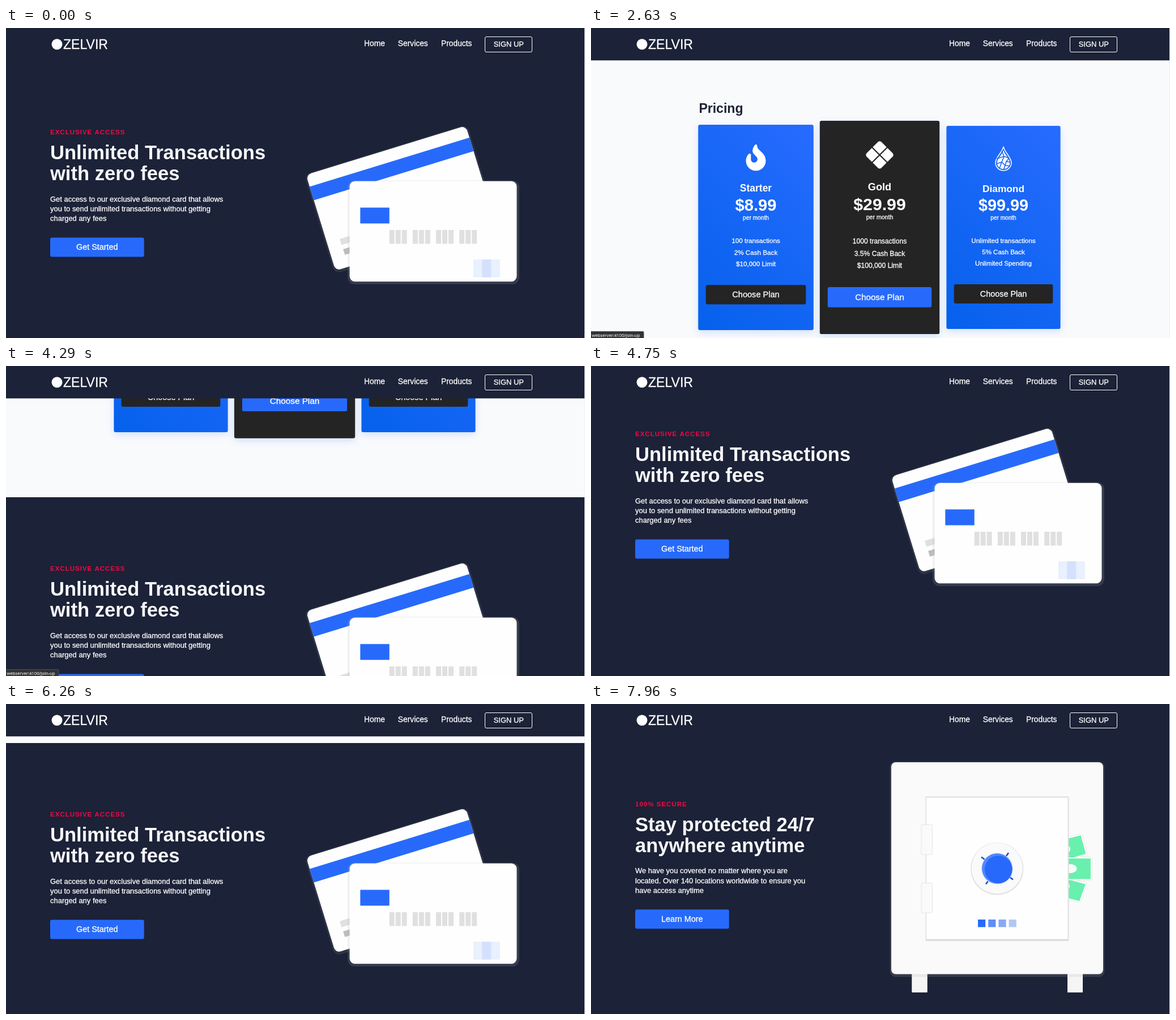
Write an HTML page with a canvas that moves like this. It is 1022 px wide and 548 px high and loops after 8 s.

```html
<!DOCTYPE html>
<html lang="en">
<head>
<meta charset="utf-8">
<title>Landing page tour</title>
<style>
  html, body { margin: 0; width: 100%; height: 100%; overflow: hidden; background: #1c2237; }
  canvas { display: block; }
</style>
</head>
<body>
<canvas id="stage" width="1022" height="548"></canvas>
<script>
const ctx = document.getElementById('stage').getContext('2d');
const W = 1022, H = 548, LOOP = 8000, TICK = 78.5, NOTCH = 248 / 3;
const NAVY = '#1c2237', BLUE = '#276afb', RED = '#f00946', INK = '#242424', PALE = '#f9fafc';
const SANS = '"Liberation Sans", Arial, sans-serif';
const HUMANIST = '"Open Sans", "Noto Sans", sans-serif';
const HERO_TOP = 647, CARD_Y = 352.5;

const clamp = v => Math.max(0, Math.min(1, v));
const easeOut = p => 1 - (1 - clamp(p)) ** 3;
const easeFast = p => 1 - (1 - clamp(p)) ** 4;
const smooth = p => { p = clamp(p); return p * p * (3 - 2 * p); };

// start, duration, wheel notches, easing
const scrolls = [
  [2690, 460, 3, smooth],
  [4160, 360, 3, easeOut],
  [4618, 440, 3, easeOut],
  [5170, 360, 3, easeOut],
  [5594, 620, -5, smooth],
];
const scrollAt = t => Math.floor(0.01 + NOTCH *
  scrolls.reduce((sum, [at, dur, n, ease]) => sum + n * ease((t - at) / dur), 0));

// 0..1 amount of a 300 ms hover transition over several [on, off] spans
const hover = (t, ...spans) => spans.reduce((sum, [on, off]) =>
  sum + easeFast((t - on) / 300) - easeFast((t - off) / 300), 0);

function text(str, x, y, size, { weight = 400, color = '#fff', align = 'left', font = SANS, spacing = 0 } = {}) {
  ctx.font = `${weight} ${size}px ${font}`;
  ctx.letterSpacing = spacing + 'px';
  ctx.fillStyle = color;
  ctx.textAlign = align;
  ctx.fillText(str, x, y);
  if (weight < 700) {
    // a hairline gives regular text its fuller on-screen weight
    ctx.strokeStyle = color;
    ctx.lineWidth = 0.3;
    ctx.lineJoin = 'round';
    ctx.strokeText(str, x, y);
  }
}

function rect(x, y, w, h, color, r = 0) {
  ctx.fillStyle = color;
  ctx.beginPath();
  ctx.roundRect(x, y, w, h, r);
  ctx.fill();
}

function outline(x, y, w, h, color, r = 0, width = 1) {
  ctx.strokeStyle = color;
  ctx.lineWidth = width;
  ctx.beginPath();
  ctx.roundRect(x, y, w, h, r);
  ctx.stroke();
}

function oval(x, y, rx, ry, color) {
  ctx.fillStyle = color;
  ctx.beginPath();
  ctx.ellipse(x, y, rx, ry, 0, 0, Math.PI * 2);
  ctx.fill();
}

function poly(points, color) {
  ctx.fillStyle = color;
  ctx.beginPath();
  points.forEach(([x, y]) => ctx.lineTo(x, y));
  ctx.closePath();
  ctx.fill();
}

function at(x, y, draw) {
  ctx.save();
  ctx.translate(x, y);
  draw();
  ctx.restore();
}

function heroText({ tag, title, copy, button }) {
  text(tag, 78, 188, 11.52, { weight: 700, color: RED, spacing: 1 });
  title.forEach((s, i) => text(s, 78, 231.7 + i * 37.7, 34.56, { weight: 700, color: '#f7f8fa' }));
  copy.forEach((s, i) => text(s, 78, 306.5 + i * 17.28, 12.96));
  rect(78, 370.5, 165.7, 34, BLUE, 3);
  text(button, 160.8, 392, 14.4, { align: 'center' });
}

const SHADE = 'rgba(170,170,170,0.18)';

function bankCards() {
  at(529.5, 259.5, () => {
    ctx.rotate(-17.1 * Math.PI / 180);
    rect(-3, -1.5, 301, 184, 'rgba(170,170,170,0.13)', 12);
    rect(0, 0, 295, 177.5, '#fefefe', 9.5);
    rect(0, 22, 295, 25, BLUE);
    rect(23.5, 126, 60, 11, '#e0e0e0');
    rect(24, 145, 60, 10.5, '#bdbdbd');
  });
  rect(603, 269.5, 303, 183.5, SHADE, 12);
  rect(606.5, 270.8, 295, 177.4, '#fefefe', 9.5);
  rect(625.3, 317.5, 51.4, 28, BLUE);
  for (let i = 0; i < 12; i++)
    rect(676.6 + Math.floor(i / 3) * 41.2 + (i % 3) * 11, 357, 9, 24.5, '#e0e0e0');
  rect(825, 409.2, 47, 31.6, '#e9f0fe');
  rect(840.3, 409.2, 16, 31.6, '#d5e1fc');
}

const cardsHero = {
  tag: 'EXCLUSIVE ACCESS',
  title: ['Unlimited Transactions', 'with zero fees'],
  copy: ['Get access to our exclusive diamond card that allows',
    'you to send unlimited transactions without getting', 'charged any fees'],
  button: 'Get Started',
};
const safeHero = {
  tag: '100% SECURE',
  title: ['Stay protected 24/7', 'anywhere anytime'],
  copy: ['We have you covered no matter where you are',
    'located. Over 140 locations worldwide to ensure you', 'have access anytime'],
  button: 'Learn More',
};

function drawCardsHero() {
  heroText(cardsHero);
  bankCards();
}

function bill(points) {
  ctx.strokeStyle = '#fff';
  ctx.lineWidth = 4;
  ctx.shadowColor = 'rgba(0,0,0,0.18)';
  ctx.shadowBlur = 2;
  poly(points, '#69f0ae');
  ctx.stroke();
  ctx.shadowBlur = 0;
  poly(points, '#69f0ae');
}

function safe() {
  for (const x of [566.5, 841]) {
    rect(x, 470, 27, 40, '#dcdcdc');
    rect(x, 470, 27, 39, '#f5f5f5');
  }
  rect(527.5, 101.5, 379, 381, SHADE, 10);
  rect(530, 103, 374, 374.5, '#fafafa', 8);

  ctx.save();
  ctx.beginPath();
  ctx.rect(842, 200, 62, 180);
  ctx.clip();
  bill([[830, 241], [864.5, 232], [873.5, 265], [830, 277]]);
  bill([[830, 307], [873, 318.5], [862, 348.5], [830, 340]]);
  bill([[830, 273], [882, 273], [882, 309.5], [830, 309.5]]);
  oval(845.5, 291, 12, 8, '#fafafa');
  oval(841, 256.5, 5, 6, '#fafafa');
  oval(840, 322, 5, 5.5, '#fafafa');
  ctx.restore();

  rect(590.5, 163.5, 253, 255.5, '#dedede');
  rect(592, 165.5, 249.5, 250, '#fefefe');
  for (const y of [213, 316]) {
    rect(582.5, y, 20.5, 53, '#fafafa', 1);
    outline(583, y + 0.5, 19.5, 52.5, '#e6e6e6', 1);
  }

  oval(716.7, 291.2, 46.6, 46.4, '#e2e2e2');
  oval(716.7, 290.3, 45, 45, '#fafafa');
  ctx.strokeStyle = '#184fc4';
  ctx.lineWidth = 2.6;
  ctx.beginPath();
  for (const [x, y, u, v] of [[689, 270.5, 697, 276.5], [731, 271.5, 737, 263],
    [737, 304.5, 745, 310.5], [703, 310, 697, 318.5]]) {
    ctx.moveTo(x, y);
    ctx.lineTo(u, v);
  }
  ctx.stroke();
  oval(716.8, 291.2, 27.8, 27.8, '#dfe6f5');
  oval(716.8, 290.8, 26.8, 26.8, '#5288fc');
  oval(719.2, 292.6, 24.4, 24.6, BLUE);
  ['#276afb', '#5c8ef8', '#87a9f3', '#b1c8f1'].forEach((c, i) =>
    rect(683 + i * 18.2, 381, 13.2, 13.4, c));
}

const flame = new Path2D('M216 24c0-24-31-33-44-13C48 192 224 200 224 288c0 36-29 64-65 64-35 0-63-30-63-65v-86c0-21-26-32-41-16C28 213 0 261 0 320c0 106 86 192 192 192s192-86 192-192C384 150 216 127 216 24z');
const drop = new Path2D('M0-21C3-10 14-2 14 7A14 14 0 0 1-14 7C-14-2-3-10 0-21z');
const cracks = new Path2D('M-3-14L1-4L-12 0M1-4L10-1M1-4L-3 6L-12 9M-3 6L3 12L0 20M3 12L12 13M10-1L5 5L3 12M-3 6L-7 17M5 5L12 6');

function fireIcon() {
  ctx.scale(0.09, 0.09);
  ctx.translate(-192, -256);
  ctx.fill(flame);
}

function tilesIcon() {
  ctx.rotate(Math.PI / 4);
  rect(-17.5, -17.5, 35, 35, '#fff', 4.2);
  rect(-18, -1, 36, 2, INK);
  rect(-1, -18, 2, 36, INK);
}

function crystalIcon() {
  ctx.translate(0, 0.5);
  ctx.strokeStyle = '#fff';
  ctx.lineWidth = 1.5;
  ctx.stroke(drop);
  ctx.save();
  ctx.translate(0, 1.6);
  ctx.scale(0.8, 0.8);
  ctx.fill(drop);
  ctx.restore();
  ctx.strokeStyle = '#1a66f5';
  ctx.lineWidth = 1.6;
  ctx.stroke(cracks);
}

const plans = [
  { x: 291, name: 'Starter', price: '$8.99', icon: fireIcon,
    perks: ['100 transactions', '2% Cash Back', '$10,000 Limit'],
    scale: t => 1 + 0.06 * hover(t, [2608, 3335]) },
  { x: 728, name: 'Diamond', price: '$99.99', icon: crystalIcon,
    perks: ['Unlimited transactions', '5% Cash Back', 'Unlimited Spending'],
    scale: t => 1 + 0.06 * hover(t, [1985, 2390]) },
  { x: 509.5, name: 'Gold', price: '$29.99', icon: tilesIcon, dark: true,
    perks: ['1000 transactions', '3.5% Cash Back', '$100,000 Limit'],
    scale: t => 1.05 + 0.01 * hover(t, [2390, 2480], [3335, 4440]) },
];

function planCard(plan, t) {
  const s = plan.scale(t);
  const mid = { align: 'center' }, bold = { align: 'center', weight: 700 };
  ctx.scale(s, s);
  let fill = INK;
  if (!plan.dark) {
    fill = ctx.createLinearGradient(-140, 140, 140, -140);
    fill.addColorStop(0, '#0561ec');
    fill.addColorStop(1, '#276bff');
  }
  ctx.shadowColor = 'rgba(56,125,255,0.2)';
  ctx.shadowBlur = 14;
  ctx.shadowOffsetY = 4.3;
  rect(-100.6, -179.5, 201.2, 359, fill, 3);
  ctx.shadowColor = 'transparent';

  ctx.fillStyle = '#fff';
  at(0, -122, plan.icon);
  text(plan.name, 0, -62.8, 17.28, bold);
  text(plan.price, 0, -29.5, 28.8, bold);
  text('per month', 0, -13.5, 10.08, mid);
  plan.perks.forEach((p, i) => text(p, 0, 27.5 + i * 20.1, 11.52, mid));

  rect(-87.3, 100.5, 174.6, 34, plan.dark ? BLUE : INK, 3);
  if (plan.dark) {
    ctx.globalAlpha = clamp(hover(t, [3420, 3760]));
    rect(-87.3, 100.5, 174.6, 34, RED, 3);
    ctx.globalAlpha = 1;
  }
  text('Choose Plan', 0, 122.5, 14.4, mid);
}

const footerColumns = [
  ['About Us', 'How it works', 'Testimonials', 'Careers', 'Investors', 'Terms of Service'],
  ['Contact Us', 'Contact', 'Support', 'Destinations', 'Sponsorships'],
  ['Videos', 'Submit Video', 'Ambassadors', 'Agency', 'Influencer'],
  ['Social Media', 'Snapvolde', 'Mingloot', 'Vidorlo', 'Quipelo'],
];

function footer() {
  text('Join our exclusive membership to receive the latest news and trends', 509, 270, 16.83,
    { align: 'center', font: HUMANIST });
  text('You can unsubscribe at any time.', 509, 304.5, 13.7,
    { align: 'center', font: HUMANIST, weight: 500 });
  rect(365, 324.5, 193.5, 28, '#fff', 1.5);
  text('Your Email', 383, 343, 12.96, { color: '#a9a9a9' });
  outline(566, 324.5, 87, 28, '#fff', 2.5);
  text('Subscribe', 609.5, 343, 12.96, { align: 'center' });
  footerColumns.forEach(([head, ...links], i) => {
    const x = 244.8 + i * 137.9;
    text(head, x, 426.3, 17.28, { weight: 700 });
    links.forEach((s, j) => text(s, x, 452 + j * 18.65, 11.52));
  });
}

function servicesPage(t) {
  const y = -scrollAt(t);
  rect(0, 57, W, Math.max(0, HERO_TOP + y - 57), PALE);
  at(0, y, () => {
    text('Pricing', 190.4, 150.2, 23.04, { weight: 700, color: NAVY });
    for (const plan of plans) at(plan.x, CARD_Y, () => planCard(plan, t));
    at(0, HERO_TOP - 58, drawCardsHero);
    at(0, 967, footer);
  });
}

function header() {
  rect(0, 0, W, 57.3, NAVY);
  oval(90, 28.8, 9.5, 9.5, '#fff');
  text('ZELVIR', 101, 37, 23.04);
  [['Home', 632], ['Services', 691.8], ['Products', 768]].forEach(([s, x]) => text(s, x, 32.4, 13.82));
  outline(845.5, 15.5, 83, 27, '#fff', 2.5);
  text('SIGN UP', 887.3, 33.2, 12.96, { align: 'center' });
}

const within = (t, a, b) => t >= a && t < b;

function underlines(t) {
  if (within(t, 740, 1850) || within(t, 6560, 6800)) rect(680, 56, 77, 2, '#4b59f7');
  if (within(t, 6400, 6560) || within(t, 6800, 7410)) rect(757, 56, 77, 2, '#4b59f7');
}

function statusBar(t) {
  let path;
  if (within(t, 980, 2000)) path = 'services';
  else if (within(t, 2000, 4600)) path = 'join-up';
  else if (within(t, 6800, 7730)) path = 'products';
  else return;
  ctx.globalAlpha = clamp((t - 900) / 240);
  rect(-2, 536, 95.5, 14, '#5a5b5e', 2);
  rect(-2, 536.7, 94.8, 14, '#323335', 2);
  text('webserver:4100/' + path, 1.5, 546, 7.7, { color: '#c6c6c6', font: HUMANIST });
  ctx.globalAlpha = 1;
}

function draw(t) {
  const held = Math.floor((t - 720) / TICK) * TICK + 740;
  rect(0, 0, W, H, NAVY);
  if (t < 1370) drawCardsHero();
  else if (t < 7730) servicesPage(held);
  else {
    at(0, -7.2, () => heroText(safeHero));
    safe();
  }
  header();
  underlines(t);
  statusBar(t);
  rect(1021, 0, 1, H, '#eeeff1');
}

const start = performance.now();
function loop() {
  draw((performance.now() - start) % LOOP);
  requestAnimationFrame(loop);
}
loop();
</script>
</body>
</html>
```
